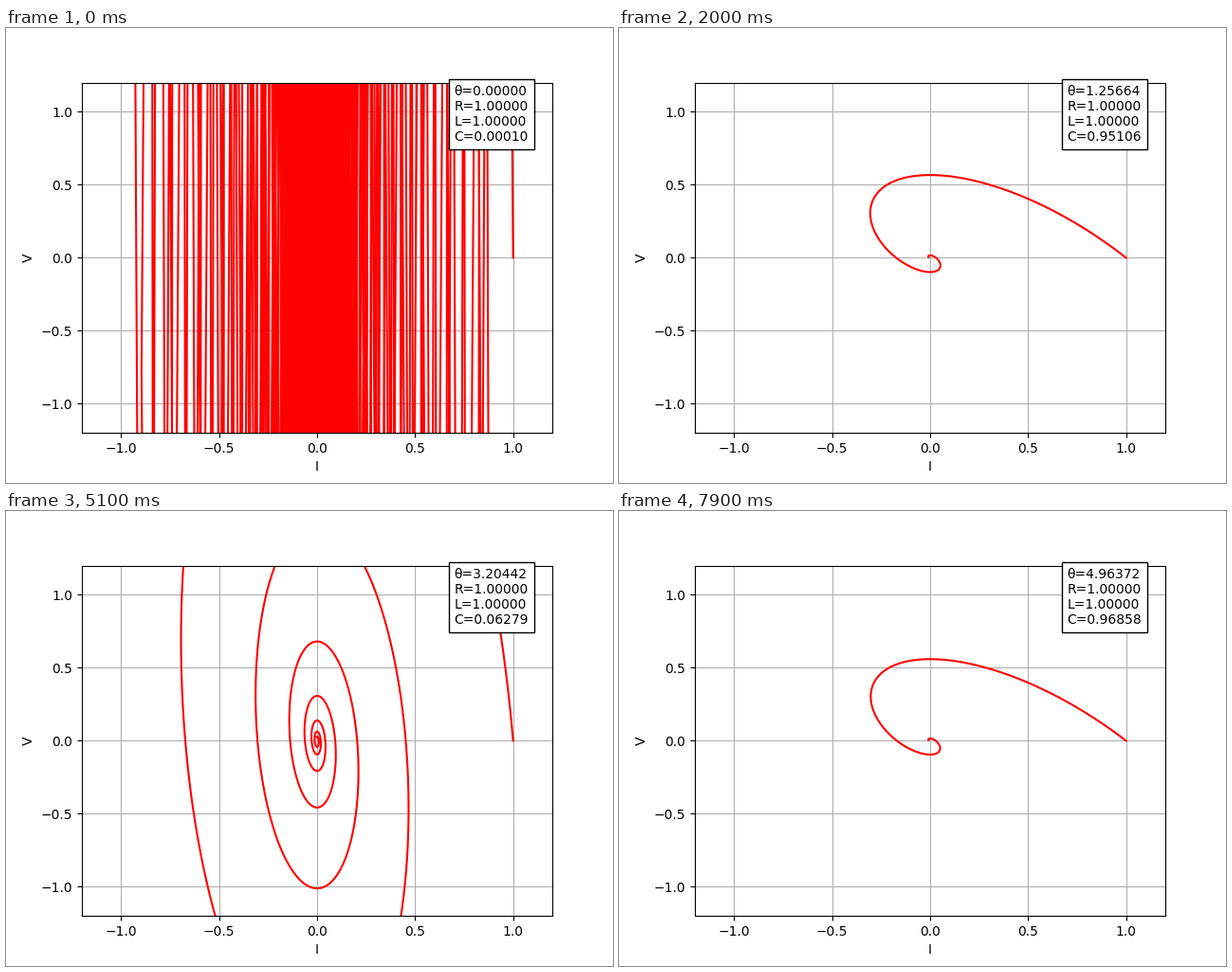
Write a matplotlib script that moves like this. It is 640 px wide and 480 px high and loops after 8000 ms.

```python
import numpy as np
import matplotlib.pyplot as plt
from matplotlib.animation import FuncAnimation

FRAMES = 80
STEP = 2 * np.pi / 100
R, L = 1.0, 1.0
C_MIN = 1e-4
t = np.arange(0, 10, 0.01)


def response(c):
    """Current and capacitor voltage of a free RLC circuit, I(0)=1, V(0)=0."""
    a = R / (2 * L)
    w = np.sqrt(1 / (L * c) - a * a)
    decay = np.exp(-a * t)
    current = decay * (np.cos(w * t) - a / w * np.sin(w * t))
    voltage = decay * np.sin(w * t) / (c * w)
    return current, voltage


fig, ax = plt.subplots(figsize=(6.4, 4.8), dpi=100)
ax.set_xlim(-1.2, 1.2)
ax.set_ylim(-1.2, 1.2)
ax.set_xlabel("I")
ax.set_ylabel("V")
ax.grid(True)
curve, = ax.plot([], [], color="red")
label = ax.text(0.7, 0.8, "", bbox=dict(facecolor="white"))


def update(i):
    theta = STEP * i
    c = max(abs(np.sin(theta)), C_MIN)
    curve.set_data(*response(c))
    label.set_text(f"θ={theta:.5f}\nR={R:.5f}\nL={L:.5f}\nC={c:.5f}")
    return curve, label


anim = FuncAnimation(fig, update, frames=FRAMES, interval=100,
                     repeat=True, repeat_delay=0)
plt.show()
```
